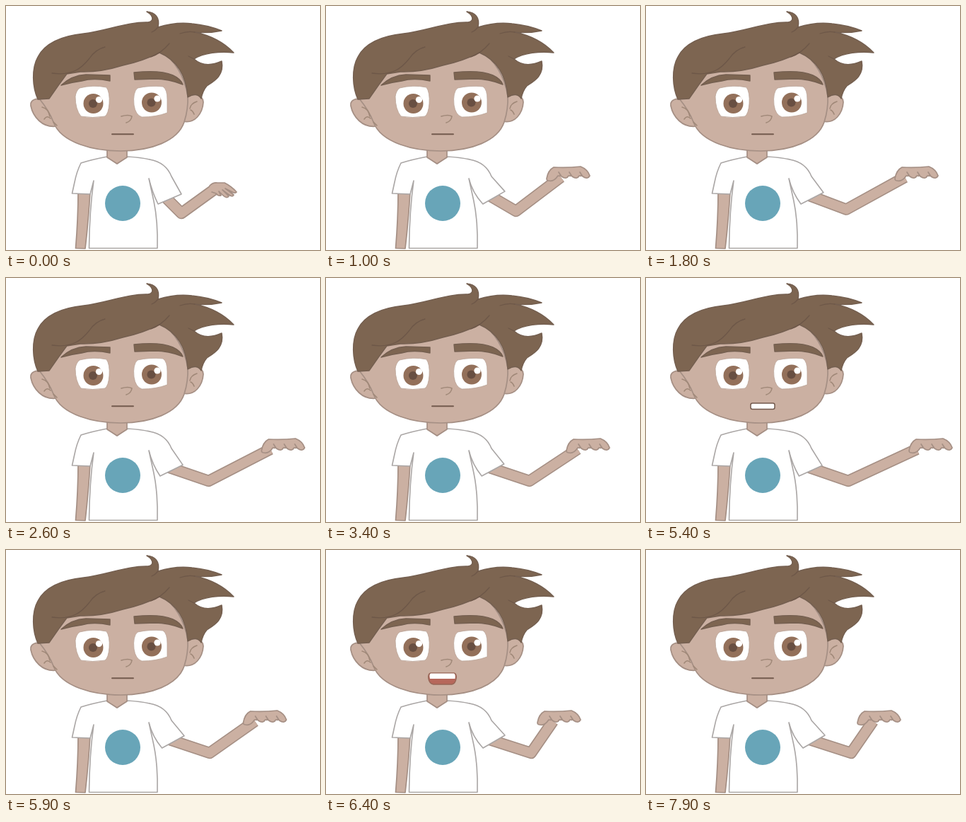
Recreate the animation shown at these times as an HTML page. Size 444 by 345 pixels, loop 8000 ms.

```html
<!DOCTYPE html>
<html lang="en">
<head>
<meta charset="utf-8">
<title>Talking boy</title>
<style>
html, body { margin: 0; width: 100%; height: 100%; overflow: hidden; background: #fff; }
svg { display: block; width: 444px; height: 345px; stroke-linejoin: round; stroke-linecap: round; }
.skin { fill: #cbb0a2; stroke: #a58f84; stroke-width: 1.7; }
.hair { fill: #7d6551; stroke: #745f50; stroke-width: 1.4; }
.shirt { fill: #fff; stroke: #aaa6a5; stroke-width: 1.6; }
.line { fill: none; stroke: #a08878; stroke-width: 1.6; }
.strand { fill: none; stroke: #6d5748; stroke-width: 1.3; }
.eye { fill: #fff; stroke: #b9a296; stroke-width: .8; }
.limb { fill: none; stroke-linecap: butt; }
</style>
</head>
<body>
<svg viewBox="0 0 444 345">
  <!-- left arm -->
  <path class="skin" d="M102 262Q102 300 98.500 342.500L112 343Q117 300 119 262Z"/>

  <!-- right arm -->
  <path id="armEdge" class="limb" stroke="#a58f84" stroke-width="16.400"/>
  <path id="armFill" class="limb" stroke="#cbb0a2" stroke-width="13.200"/>
  <path id="hand" class="skin"/>

  <!-- shirt and neck -->
  <path id="sleeve" class="shirt"/>
  <path class="shirt" d="M203 217Q190 214 171 213L157 223L143 213Q122 217 106 222Q100 234 97 249L93.500 265L119 266L124 247Q118 290 117.500 342.500H214Q215 305 209 276Q206 262 202 244"/>
  <path class="skin" d="M143 198V214L157 223L171 214V198Z"/>
  <circle cx="165" cy="279" r="25" fill="#68a5b8"/>

  <!-- head -->
  <path class="skin" d="M50 132C42 130 34 133 35 141C38 156 51 173 72 170L75 145Z"/>
  <path class="skin" d="M254 130C265 122 278 124 279 136C278 152 267 167 250 163Z"/>
  <path class="skin" d="M47 131Q61 148 67 164C78 194 125 205 162 205C205 205 243 191 252 164Q258 145 257 127Q250 85 216 60L85 85Z"/>
  <path class="line" d="M51 143Q60 145 62 156M54 160Q58 154 63 159M72 169L67 164M270 135Q261 138 260 145M261 147Q264 148 266 153"/>
  <path class="hair" d="M45 132C37 114 36 88 45 72C56 51 81 42 110 39C143 35 172 22 201 23C211 21 207 12 199 8C211 9 218 16 215 30C231 25 246 23 263 25Q285 27 305 35Q286 39 267 37Q301 44 322 66C303 64 279 66 266 75C276 84 289 85 305 78C309 98 295 106 284 113Q278 120 276 131Q270 121 257 129C255 98 241 76 217 66Q193 78 165 84Q133 94 105 93L86 96Q74 112 61 131Z"/>
  <path class="strand" d="M65 95C94 99 107 88 118 74Q127 61 140 58M205 72Q219 67 231 53M215 30Q211 35 206 37M267 37Q257 35 246 39M266 75L258 71"/>

  <!-- brows -->
  <path class="hair" d="M78 112Q93 98 113 97L147 98V106Q124 101 107 106Q92 108 78 112Z"/>
  <path class="hair" d="M181 94Q218 90 236 98Q247 103 250 111Q230 103 210 103L182 104Z"/>

  <!-- eyes -->
  <path class="eye" d="M104 116Q123 111 142 115Q147 122 146 138Q145 152 140 156Q122 159 106 156Q98 146 98 128Q99 120 104 116Z"/>
  <path class="eye" d="M186 116Q204 112 222 114Q228 118 228 132V151Q212 157 192 157Q183 154 181 140Q179 122 186 116Z"/>
  <g id="iris">
    <circle cx="123.500" cy="138" r="14" fill="#93705a"/>
    <circle cx="123" cy="138" r="6" fill="#684f42"/>
    <circle cx="131.500" cy="132.500" r="4.600" fill="#fff"/>
  </g>
  <use href="#iris" x="82.500" y="-1.500"/>
  <path class="line" d="M163 156Q173 153 178 156Q177 163 170 165"/>

  <!-- mouths: closed, teeth, open -->
  <g id="mouths" stroke="#735a4e" stroke-width="1.500">
    <path d="M150 181.300H180" fill="none" stroke-width="1.900"/>
    <rect x="148" y="177" width="34" height="8.500" rx="2.500" fill="#fff"/>
    <g>
      <path d="M148 174H181Q185 175 184 182Q183 189 178 190H152Q146 189 145 182Q144 175 148 174Z" fill="#b6675b" stroke="#966657"/>
      <path d="M148 174.500H181Q183.500 176 182.500 182H147Q145.500 176 148 174.500Z" fill="#fff" stroke="none"/>
    </g>
  </g>
</svg>
<script>
const LOOP = 8000, STEP = 100;
const HAND_SWAP = 500, RISE = 1000, UNFOLD = 2000;
const TALK_START = 4400, TALK_END = 7600, SYLLABLE = 800;
const NEAR = 299, FAR = 372;

// The hand slides steadily between these turning points: [time, x].
const TURNS = [[0, 288], [1000, 312], [2200, FAR], [4300, 316], [5400, FAR], [6400, NEAR], [LOOP, NEAR]];

const OPEN_PALM = "M0 5Q5 0 11 1L21 1Q31 6 38 14Q36 17 30 13L22 9L34 18Q32 22 26 17L18 11L27 20Q24 24 18 18L13 13L16 19Q12 20 9 16L3 14";
const FINGER = "q-3 6-10 1l-4-6q5 7-1 5";
const FLAT_PALM = "M0 17Q2 5 10 1Q30 2 48 0Q58 4 61 13" + FINGER.repeat(3) + "Q10 22 3 20Q0 20 0 17Z";

const el = id => document.getElementById(id);
const set = (id, name, value) => el(id).setAttribute(name, value);
const mix = (a, b, k) => a + (b - a) * k;

function handX(t) {
  const next = TURNS.findIndex(([time]) => time > t);
  const [t0, x0] = TURNS[next - 1], [t1, x1] = TURNS[next];
  return mix(x0, x1, (t - t0) / (t1 - t0));
}

function drawArm(t) {
  const rise = Math.min(1, t / RISE), unfold = Math.min(1, t / UNFOLD);
  const x = handX(t), y = mix(249, 227, rise);
  const reach = Math.max(0, (x - NEAR) / (FAR - NEAR));
  const lift = rise * (1 - .8 * reach ** 2);

  const shoulder = `${mix(225, 231, rise)} ${mix(270, 268, rise)}`;
  const elbow = `${mix(248, mix(290, 286, reach), unfold)} ${mix(293, 287, unfold)}`;
  const wrist = `${x + mix(7, mix(22, 11, reach), rise)} ${y + mix(10, 15, rise)}`;
  const arm = `M${shoulder}L${elbow}L${wrist}`;
  set("armEdge", "d", arm);
  set("armFill", "d", arm);
  set("hand", "d", t < HAND_SWAP ? OPEN_PALM : FLAT_PALM);
  set("hand", "transform", `translate(${x} ${y})`);

  const cuffTop = `${mix(248, 253, lift)} ${mix(266, 262, lift)}`;
  const cuffBottom = `${mix(215, 222, lift)} 280`;
  set("sleeve", "d", `M203 217Q226 221 234 241L${cuffTop}L${cuffBottom}Q207 264 202 244`);
}

function drawMouth(t) {
  const talking = t > TALK_START && t < TALK_END;
  const phase = (t - TALK_START) / SYLLABLE * 2 * Math.PI;
  const shape = talking ? Math.round(1 - Math.cos(phase)) : 0;
  [...el("mouths").children].forEach((mouth, i) => mouth.style.display = i === shape ? "" : "none");
}

const start = performance.now();
function frame() {
  const t = Math.floor((performance.now() - start) % LOOP / STEP) * STEP;
  drawArm(t);
  drawMouth(t);
  requestAnimationFrame(frame);
}
frame();
</script>
</body>
</html>
```
